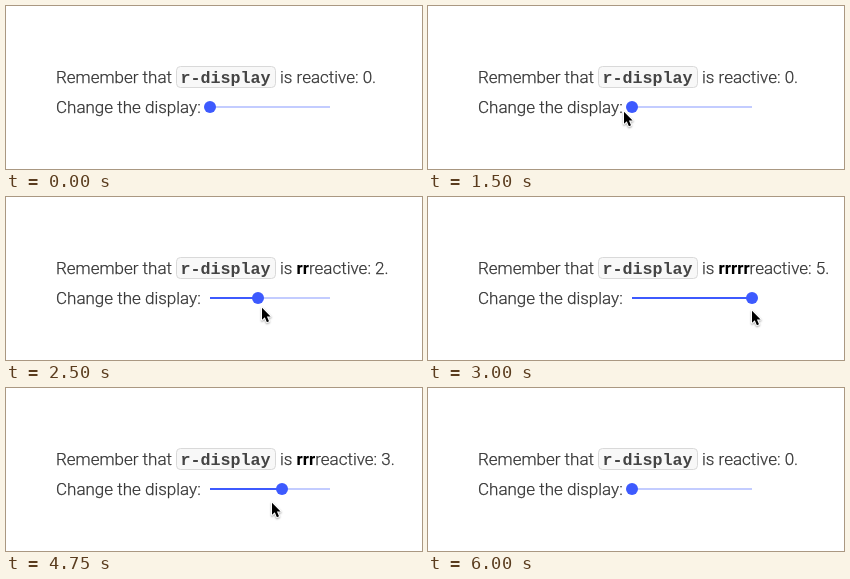
An HTML page with a canvas for the animation above (6750 ms loop, 416 by 163 pixels).

```html
<!DOCTYPE html>
<html lang="en">
<head>
<meta charset="utf-8">
<title>Reactive display</title>
<style>
  html, body { margin: 0; width: 100%; height: 100%; overflow: hidden; background: #fff; }
  canvas { display: block; width: 416px; height: 163px; }
</style>
</head>
<body>
<canvas id="stage"></canvas>
<script>
const W = 416, H = 163, LOOP = 6750, STEP = 250;
const BLUE = '#3d5afe', PALE = '#c3ccff', INK = '#333';
const LIGHT = '300 17px Roboto, sans-serif';
const HEAVY = 'bold 17px Roboto, sans-serif';
const CODE = 'bold 16.7px "Liberation Mono", monospace';
const MAX = 5, TRACK = { x: 204, y: 101, length: 120 };

// Turning points of the pointer: [step, x, y].
const PATH = [
  [1, 163, 64], [3, 182, 76], [4, 185, 113], [6, 195, 105], [8, 214, 105],
  [10, 255, 110], [11, 280, 113], [12, 323, 113], [13, 344, 112],
  [16, 344, 112], [17, 333, 112], [19, 265, 114], [21, 177, 114],
  [22, 147, 110], [23, 163, 86]
];

const canvas = document.getElementById('stage');
const dpr = window.devicePixelRatio || 1;
canvas.width = W * dpr;
canvas.height = H * dpr;
const ctx = canvas.getContext('2d');

function pointerAt(step) {
  const next = PATH.findIndex(([s]) => s >= step);
  if (next < 1) return PATH.at(next).slice(1);
  const [s0, x0, y0] = PATH[next - 1], [s1, x1, y1] = PATH[next];
  const u = (step - s0) / (s1 - s0);
  return [x0 + (x1 - x0) * u, y0 + (y1 - y0) * u];
}

function isVisible(step) {
  const resting = step > 13 && step < 16;
  return step >= 1 && step <= 23 && !resting;
}

// The knob is held slightly right of its centre line.
function valueAt(x) {
  const raw = Math.round((x + 3 - TRACK.x) / TRACK.length * MAX);
  return Math.min(MAX, Math.max(0, raw));
}

function write(text, x, y, font, color = INK, weight = 0) {
  ctx.font = font;
  ctx.fillStyle = ctx.strokeStyle = color;
  ctx.fillText(text, x, y);
  if (weight) {
    ctx.lineWidth = weight;
    ctx.strokeText(text, x, y);
  }
  return x + ctx.measureText(text).width;
}

const writeBody = (text, x, y) => write(text, x, y, LIGHT, INK, 0.25);

function drawCode() {
  ctx.beginPath();
  ctx.roundRect(170.5, 60.5, 99, 21, 4);
  ctx.fillStyle = '#f8f8f8';
  ctx.fill();
  ctx.strokeStyle = '#d9d9d9';
  ctx.lineWidth = 1;
  ctx.stroke();
  write('r-display', 174.5, 77, CODE, '#444');
}

function drawSentence(value) {
  writeBody('Remember that', 50, 77);
  drawCode();
  let x = writeBody('is ', 274, 77);
  x = write('r'.repeat(value), x, 77, HEAVY, '#000');
  writeBody(`reactive: ${value}.`, x, 77);
}

function drawSlider(value) {
  const { x, y, length } = TRACK;
  const knob = x + length * value / MAX;
  writeBody('Change the display:', 50, 107);
  ctx.fillStyle = PALE;
  ctx.fillRect(x, y - 1, length, 2);
  ctx.fillStyle = BLUE;
  ctx.fillRect(x, y - 1, knob - x, 2);
  ctx.beginPath();
  ctx.arc(knob, y, 6, 0, Math.PI * 2);
  ctx.fill();
}

function drawPointer([x, y]) {
  const arrow = new Path2D('M0 0V12L2.8 9.4L4.9 14.4L7 13.5L4.9 8.6H8.6Z');
  ctx.save();
  ctx.translate(x + 1, y + 0.8);
  ctx.lineJoin = 'round';
  ctx.lineWidth = 2;
  ctx.strokeStyle = '#fff';
  ctx.shadowColor = 'rgba(0, 0, 0, 0.35)';
  ctx.shadowBlur = 2 * dpr;
  ctx.shadowOffsetY = dpr;
  ctx.stroke(arrow);
  ctx.shadowColor = 'transparent';
  ctx.fillStyle = '#000';
  ctx.fill(arrow);
  ctx.restore();
}

function draw(time) {
  const step = Math.floor(time % LOOP / STEP);
  const tip = pointerAt(step);
  const value = valueAt(tip[0]);
  ctx.setTransform(dpr, 0, 0, dpr, 0, 0);
  ctx.fillStyle = '#fff';
  ctx.fillRect(0, 0, W, H);
  drawSentence(value);
  drawSlider(value);
  if (isVisible(step)) drawPointer(tip);
}

function tick() {
  draw(performance.now());
  requestAnimationFrame(tick);
}
tick();
</script>
</body>
</html>
```
